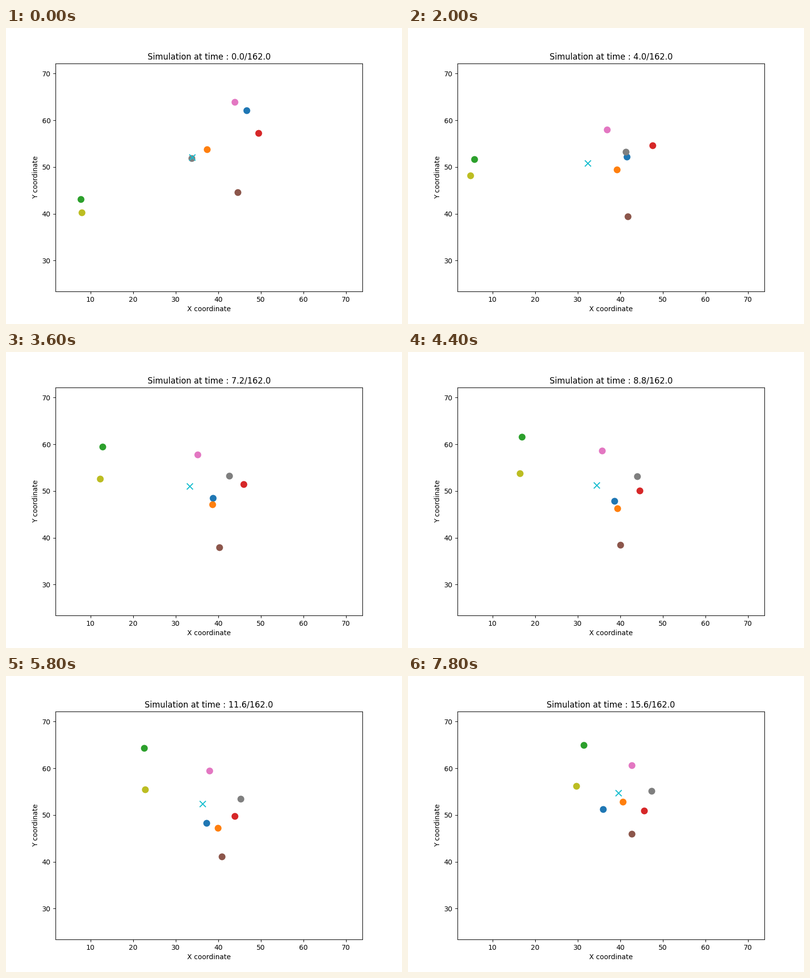
These frames come from a looping animation (800x600 px, 8000 ms). A matplotlib script:

```python
import numpy as np
import matplotlib.pyplot as plt
from matplotlib.animation import FuncAnimation

FRAMES, INTERVAL = 40, 200
STEP, TOTAL = 0.4, 162.0
XLIM, YLIM = (1.78, 73.86), (23.39, 72.15)

# Key points of each dot's path in stage pixels, reached at KEYS
KEYS = np.array([0, 5, 18, 25, 33, 39])
PATHS = {
    "C0": [(486, 167), (464, 225), (418, 296), (417, 304), (394, 287), (394, 270)],
    "C1": [(406, 246), (425, 269), (417, 309), (427, 320), (429, 287), (434, 255)],
    "C2": [(151, 347), (117, 314), (195, 192), (255, 160), (303, 138), (355, 140)],
    "C3": [(510, 213), (502, 222), (480, 268), (462, 286), (463, 281), (477, 273)],
    "C5": [(468, 333), (455, 365), (431, 396), (428, 384), (446, 344), (452, 320)],
    "C6": [(462, 150), (421, 203), (387, 208), (399, 194), (427, 190), (452, 181)],
    "C7": [(375, 264), (430, 252), (451, 251), (470, 252), (478, 243), (492, 233)],
    "C8": [(153, 374), (108, 333), (190, 257), (253, 239), (306, 224), (340, 223)],
}


def glide(points, t):
    """Monotone cubic path: eases through the key points, rests where it turns."""
    p = np.array(points, float)
    h = np.diff(KEYS)[:, None]
    s = np.diff(p, axis=0) / h
    a, b, ha, hb = s[:-1], s[1:], h[:-1], h[1:]
    m = np.zeros_like(p)
    np.divide(3 * (ha + hb) * a * b, (2 * hb + ha) * b + (hb + 2 * ha) * a,
              out=m[1:-1], where=a * b > 0)
    m[0] = 1.5 * s[0] - 0.5 * m[1]
    m[-1] = 1.5 * s[-1] - 0.5 * m[-2]

    i = np.clip(np.searchsorted(KEYS, t, side="right") - 1, 0, len(h) - 1)
    u = (t[:, None] - KEYS[i, None]) / h[i]
    v = 1 - u
    return (v * v * ((1 + 2 * u) * p[i] + u * h[i] * m[i])
            + u * u * ((1 + 2 * v) * p[i + 1] - v * h[i] * m[i + 1]))


fig, ax = plt.subplots(figsize=(8, 6), dpi=100)
ax.set(xlim=XLIM, ylim=YLIM, xlabel="X coordinate", ylabel="Y coordinate")
title = ax.set_title("")


def to_data(pixels):
    height = fig.bbox.height
    return ax.transData.inverted().transform(pixels * [1, -1] + [0, height])


steps = np.arange(FRAMES)
tracks = {c: to_data(glide(p, steps)) for c, p in PATHS.items()}
centre = np.mean(list(tracks.values()), axis=0)

dots = {c: ax.scatter([], [], s=80, color=c) for c in tracks}
cross = ax.scatter([], [], s=80, color="C9", marker="x")


def draw(n):
    for c, dot in dots.items():
        dot.set_offsets(tracks[c][n])
    cross.set_offsets(centre[n])
    title.set_text(f"Simulation at time : {n * STEP:.1f}/{TOTAL}")
    return [*dots.values(), cross, title]


anim = FuncAnimation(fig, draw, frames=FRAMES, interval=INTERVAL,
                     repeat=True, repeat_delay=0)
plt.show()
```
